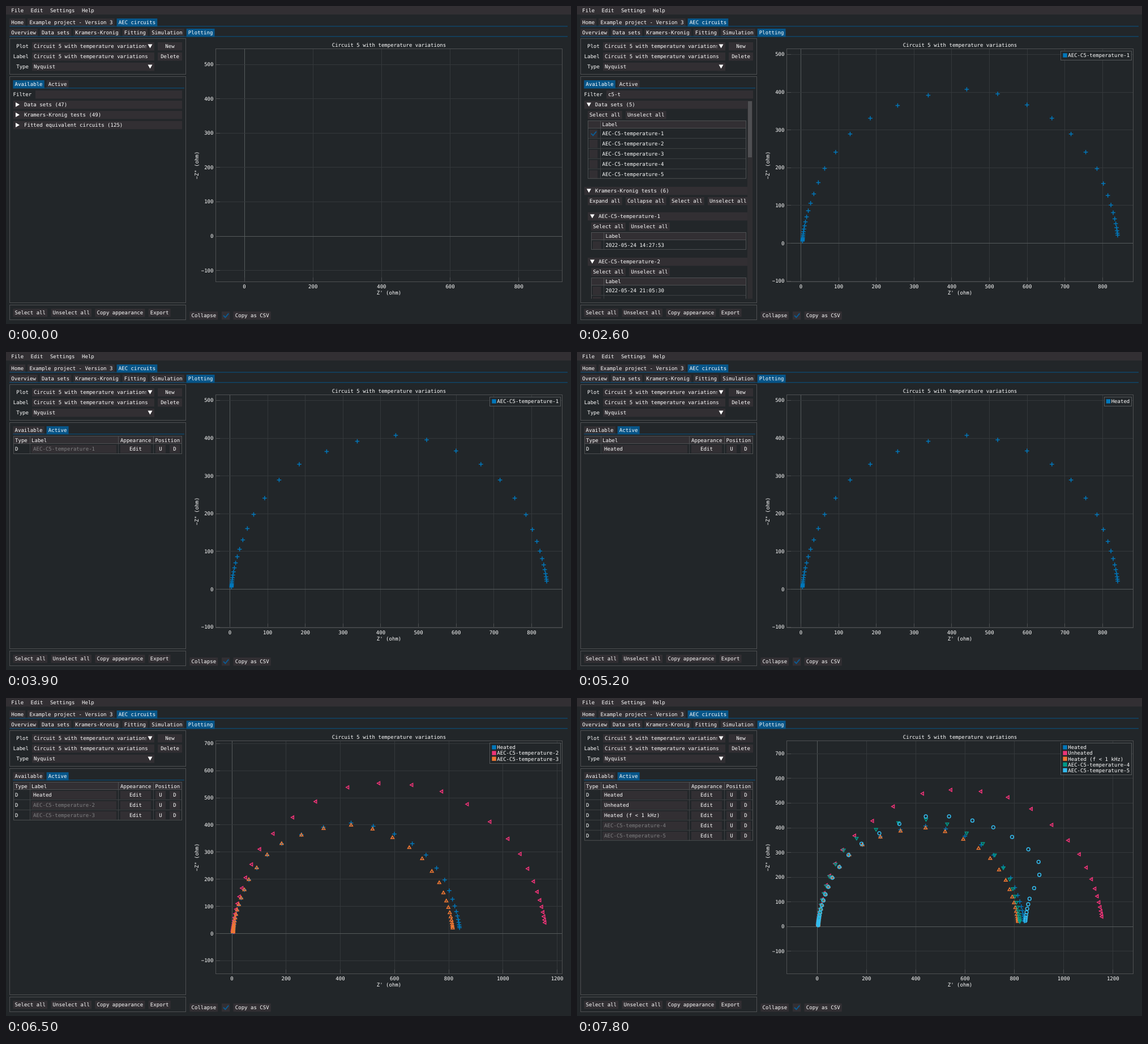
Animation of 998 by 561 pixels, one loop 8000 ms. Source, as an HTML page:

```html
<!DOCTYPE html>
<html lang="en">
<head>
<meta charset="utf-8">
<title>Plotting tab</title>
<style>
  html, body { margin: 0; width: 100%; height: 100%; overflow: hidden; background: #222629; }
  svg { display: block; width: 998px; height: 561px; }
  text { font: 9.066px "DejaVu Sans Mono", monospace; fill: #fff; text-rendering: geometricPrecision; }
</style>
</head>
<body>
<svg id="stage" viewBox="0 0 998 561"></svg>
<script>
const BG = '#222629', FRAME = '#322f33', ACCENT = '#075588', BORDER = '#4e5052', LIGHT = '#3e4144',
      GRID = '#34383b', AXIS = '#555a5b', MUTED = '#808183';
// Character width, frame padding, frame height, row pitch and the gaps between tabs and buttons
const CHAR = 5.458, PAD = 3.1, TALL = 14.4, PITCH = 17.95, TAB_GAP = 3.9, GAP = 6.25;

// Drawing helpers: every one returns SVG markup
const rect = (x1, y1, x2, y2, fill = FRAME) =>
  `<rect x="${x1}" y="${y1}" width="${x2 - x1}" height="${y2 - y1}" fill="${fill}"/>`;
const box = (x1, y1, x2, y2, fill = 'none', stroke = BORDER) =>
  `<rect x="${x1 + .5}" y="${y1 + .5}" width="${x2 - x1 - 1}" height="${y2 - y1 - 1}" fill="${fill}" stroke="${stroke}"/>`;
const path = (d, stroke, width = 1, fill = 'none') =>
  `<path d="${d}" stroke="${stroke}" stroke-width="${width}" fill="${fill}"/>`;
const hline = (x1, x2, y, color = BORDER) => path(`M${x1} ${y}H${x2}`, color);
const vline = (x, y1, y2, color = BORDER) => path(`M${x} ${y1}V${y2}`, color);
const text = (x, cy, s, anchor = 'start', extra = '') =>
  `<text x="${x}" y="${cy + 3}" text-anchor="${anchor}" ${extra}>${String(s).replace(/</g, '&lt;')}</text>`;
const frame = (x1, x2, cy, fill) => rect(x1, cy - 7, x2, cy - 7 + TALL, fill);
const button = (x1, x2, cy, s, fill) => frame(x1, x2, cy, fill) + text((x1 + x2) / 2, cy, s, 'middle');
const field = (x1, x2, cy, s, extra) => frame(x1, x2, cy) + text(x1 + PAD, cy, s, 'start', extra);
const arrowDown = (x, cy) => path(`M${x - 4} ${cy - 3.5}h8l-4 7z`, 'none', 0, '#fff');
const arrowRight = (x, cy) => path(`M${x - 3.5} ${cy - 4}v8l7 -4z`, 'none', 0, '#fff');
const check = (x, cy, on) => frame(x, x + TALL, cy) +
  (on ? path(`M${x + 3} ${cy}l3.4 3.4l5.8 -7`, '#0b5c95', 1.8) : '');
const clip = (id, x, y, w, h, body) =>
  `<clipPath id="${id}"><rect x="${x}" y="${y}" width="${w}" height="${h}"/></clipPath><g clip-path="url(#${id})">${body}</g>`;

// Buttons as wide as their labels, laid out from left to right
const row = (x, cy, labels, gap = GAP, active) => labels.map(s => {
  const left = x, right = x + s.length * CHAR + 2 * PAD;
  x = right + gap;
  return button(left, right, cy, s, s === active ? ACCENT : FRAME);
}).join('');
const tabs = (x, cy, end, active, labels) =>
  row(x, cy, labels, TAB_GAP, active) + hline(x, end, cy + 6.8, ACCENT);
const pickers = (x, cy) => row(x, cy, ['Select all', 'Unselect all']);

const TITLE = 'Circuit 5 with temperature variations';

function shell() {
  return rect(0, 0, 998, 561, BG) + rect(0, 0, 998, 15) +
    row(6.2, 8, ['File', 'Edit', 'Settings', 'Help']) +
    tabs(6.2, 29, 992, 'AEC circuits', ['Home', 'Example project - Version 3', 'AEC circuits']) +
    tabs(6.2, 47, 992, 'Plotting', ['Overview', 'Data sets', 'Kramers-Kronig', 'Fitting', 'Simulation', 'Plotting']) +
    box(6, 57, 318, 121) +
    [['Plot', TITLE], ['Label', TITLE], ['Type', 'Nyquist']].map(([label, value], i) => {
      const cy = 71 + PITCH * i;
      return text(40, cy, label, 'end') + field(46, 262, cy, value) +
        (label === 'Label' ? '' : frame(247.5, 262, cy) + arrowDown(254.5, cy));
    }).join('') +
    button(268, 311, 71, 'New') + button(268, 311, 89, 'Delete') +
    box(6, 527, 318, 554) +
    row(12.4, 541, ['Select all', 'Unselect all', 'Copy appearance', 'Export']) +
    row(324.4, 546, ['Collapse']) + check(381, 546, true) + row(401.6, 546, ['Copy as CSV']);
}

const panel = (active, body) => rect(6, 124, 318, 524, BG) + box(6, 124, 318, 524) +
  tabs(12.4, 138, 315, active, ['Available', 'Active']) + body;

const filter = s => text(12.5, 156, 'Filter') + field(52, 311, 156, s);

const collapsed = () => panel('Available', filter('') +
  ['Data sets (47)', 'Kramers-Kronig tests (49)', 'Fitted equivalent circuits (125)'].map((s, i) => {
    const cy = 174 + PITCH * i;
    return frame(13, 311, cy) + arrowRight(20.5, cy) + text(32, cy, s);
  }).join(''));

const header = (x, cy, s) => frame(x, 301, cy) + arrowDown(x + 8, cy) + text(x + 19, cy, s);

function checkTable(x, cy, rows, checked) {
  const top = cy - 7, body = cy + 6, end = body + PITCH * rows.length;
  return rect(x, top, 299, body) + vline(x + 22.5, body, end, LIGHT) + vline(x + 22.5, top, body) +
    hline(x, 299, body + .5) + text(x + 25.5, cy, 'Label') +
    rows.map((s, i) => {
      const y = cy + 16 + PITCH * i;
      return check(x + 3, y, i === checked) + text(x + 25.5, y, s) + (i ? hline(x, 299, y - 9.5, LIGHT) : '');
    }).join('') + box(x, top, 299, end);
}

const testGroup = (cy, label, dates) =>
  header(19, cy, label) + pickers(25, cy + 18) + checkTable(25, cy + 35, dates);

const auto = n => 'AEC-C5-temperature-' + n;

function expanded(id, checked) {
  return panel('Available', filter('c5-t') + clip(id, 12, 165, 300, 351.5,
    header(13, 174, 'Data sets (5)') + pickers(18.9, 192) +
    checkTable(19, 209, [1, 2, 3, 4, 5].map(auto), checked) +
    header(13, 326, 'Kramers-Kronig tests (6)') +
    row(18.9, 344, ['Expand all', 'Collapse all', 'Select all', 'Unselect all']) +
    testGroup(371, auto(1), ['2022-05-24 14:27:53']) +
    testGroup(451, auto(2), ['2022-05-24 21:05:30', '']) +
    rect(301, 167, 310, 517, '#2f2e31') + rect(302, 168, 309, 267, '#4f4f52')));
}

function activeTable(labels) {
  const end = 162 + PITCH * labels.length;
  return panel('Active', rect(13, 149, 311, 162) +
    [42.5, 198.5, 260.5].map(x => vline(x, 162, end, LIGHT) + vline(x, 148, 162)).join('') + hline(13, 311, 161.5) +
    text(16, 155.5, 'Type') + text(45, 155.5, 'Label') + text(202, 155.5, 'Appearance') + text(263.5, 155.5, 'Position') +
    labels.map((s, i) => {
      const y = 171 + PITCH * i;
      return text(16, y, 'D') + field(45, 195, y, s, s.startsWith('AEC') ? `style="fill:${MUTED}"` : '') +
        button(202, 256, y, 'Edit') + button(264, 282, y, 'U') + button(289, 307, y, 'D') +
        (i ? hline(13, 311, y - 9.5, LIGHT) : '');
    }).join('') + box(13, 148, 311, end));
}

// Spectra: a spline through every third sample of the arc, with tails that shrink geometrically
const RSERIES = 4, SPAN = 3;
const tail = ([x, y], end, ratio) => i => [end + (x - end) * ratio ** (1.6 * i), y * ratio ** i];
const spline = (p0, p1, p2, p3, t) => p1.map((v, j) => {
  const m1 = (p2[j] - p0[j]) / 2, m2 = (p3[j] - v) / 2, d = p2[j] - v;
  return v + t * (m1 + t * (3 * d - 2 * m1 - m2 + t * (m1 + m2 - 2 * d)));
});
// Samples sit closer together just before the apex
const sweep = i => i - .17 * Math.exp(-2 * (i - 4.8) ** 2);

function spectrum(color, shape, end, count, knots) {
  const left = tail(knots[0], RSERIES, .812), right = tail(knots.at(-1), end, .8);
  const p = [left(SPAN), ...knots, right(SPAN)], last = SPAN * (knots.length - 1);
  const arc = Array.from({ length: last }, (_, i) => {
    const u = sweep(i) / SPAN, k = Math.max(0, Math.floor(u));
    return spline(p[k], p[k + 1], p[k + 2], p[k + 3], u - k);
  });
  const high = Array.from({ length: 17 }, (_, i) => left(i + 1));
  const low = Array.from({ length: count }, (_, i) => right(i));
  return { color, shape, points: [...arc, ...high, ...low] };
}

const spectra = [
  spectrum('#0077bb', 'plus', 841.5, 11, [[63, 198], [184, 331], [440.5, 407.5], [665.5, 331], [785, 197.5]]),
  spectrum('#ee3377', 'left', 1159, 8, [[51, 206], [152.5, 368], [429, 539], [774.5, 523.5], [1019, 349], [1113, 192]]),
  spectrum('#ee7733', 'up', 816, 11, [[62.5, 198.5], [183.5, 331], [440.5, 399], [654.5, 316.5], [765, 187]]),
  spectrum('#009988', 'down', 823, 11, [[50, 203], [160, 358], [442.5, 434], [672, 336.5], [781, 192]]),
  spectrum('#33bbee', 'circle', 843, 8, [[61.5, 197.5], [180, 335.5], [441.5, 446], [714.5, 402], [898, 262], [861.5, 112.5]])
];
const markers = {
  plus: 'm-3.8 0h7.6m-3.8 -3.8v7.6',
  left: 'm-3.2 0l4.8 -2.8v5.6z',
  up: 'm0 -3.2l2.8 4.8h-5.6z',
  down: 'm0 3.2l2.8 -4.8h-5.6z',
  circle: 'm-2.9 0a2.9 2.9 0 1 0 5.8 0a2.9 2.9 0 1 0 -5.8 0z'
};

function legend(labels) {
  if (!labels.length) return '';
  const x = 979 - 15.5 - CHAR * Math.max(...labels.map(s => s.length));
  return box(Math.round(x), 79, 980, Math.round(95.5 + 10.1 * (labels.length - 1)), BG, '#55585a') +
    labels.map((s, i) => {
      const y = 87.3 + 10.1 * i;
      return rect(x + 4, y - 4, x + 11.4, y + 3.4, spectra[i].color) + text(x + 12.9, y, s);
    }).join('');
}

// View: origin in pixels and pixels per ohm
function plot([ox, oy, k], labels) {
  const snap = v => Math.floor(v) + .5, dx = k > .65 ? 100 : 200;
  const minus = v => String(v).replace('-', '\u2212');
  let out = rect(325, 60, 992, 514, BG);
  for (let v = 0; ox + v * k < 983; v += dx) {
    const x = ox + v * k;
    out += vline(snap(x), 76, 486, v ? GRID : AXIS) + vline(snap(x), 479, 486) + text(x, 494.5, v, 'middle');
  }
  for (let v = -100; oy - v * k > 75; v += 100) {
    const y = oy - v * k;
    out += hline(371, 983, snap(y), v ? GRID : AXIS) + hline(371, 378, snap(y)) + text(366.5, y, minus(v), 'end');
  }
  out += box(370, 75, 983, 487);
  labels.forEach((_, i) => {
    const { color, shape, points } = spectra[i];
    const d = points.map(([x, y]) => `M${(ox + x * k).toFixed(2)} ${(oy - y * k).toFixed(2)}${markers[shape]}`).join('');
    out += path(d, color, 1.5);
  });
  return out + legend(labels) + text(676.5, 69, TITLE, 'middle') + text(676.5, 506, "Z' (ohm)", 'middle') +
    text(0, 0, minus('-Z" (ohm)'), 'middle', 'transform="translate(336.5 281) rotate(-90)"');
}

const wide = [421, 406, .606], single = [395.5, 418.5, .6662];
const trio = ['Heated', auto(2), auto(3)];
const all = ['Heated', 'Unheated', 'Heated (f < 1 kHz)', auto(4), auto(5)];
const scenes = [
  collapsed() + plot(wide, []),
  expanded('listA') + plot(wide, []),
  expanded('listB', 0) + plot(single, [auto(1)]),
  activeTable([auto(1)]) + plot(single, [auto(1)]),
  activeTable(['Heated']) + plot(single, ['Heated']),
  activeTable(trio) + plot([399, 415.5, .4788], trio),
  activeTable(all) + plot([424.2, 403.2, .4355], all)
];

const stage = document.getElementById('stage');
stage.innerHTML = shell() + scenes.map(s => `<g class="scene">${s}</g>`).join('');
const layers = [...stage.querySelectorAll('.scene')];

// Each scene fades in over the previous one in four steps, then holds
const LOOP = 8000, HOLD = 1000, FADE = 300, STEP = 100;
function draw() {
  const t = performance.now() % LOOP - HOLD, period = HOLD + FADE;
  const current = t < 0 ? 0 : Math.floor(t / period) + 1;
  const mix = t < 0 ? 1 : Math.min(1, (Math.floor(t % period / STEP) + 1) / 4);
  layers.forEach((g, i) => {
    const shown = i === current || (i === current - 1 && mix < 1);
    g.style.visibility = shown ? 'visible' : 'hidden';
    g.style.opacity = i === current ? mix : 1;
  });
  requestAnimationFrame(draw);
}
draw();
</script>
</body>
</html>
```
